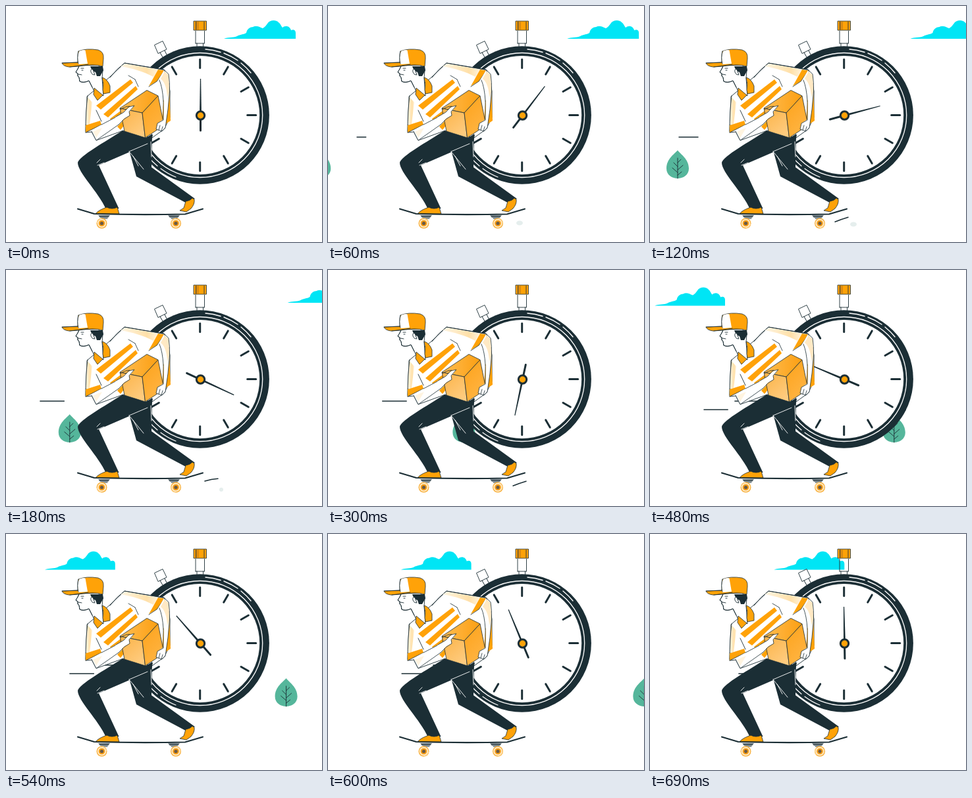
An HTML page that plays this animation: 480 by 360 pixels, repeating every 720 ms.

```html
<!DOCTYPE html>
<html lang="en">
<head>
<meta charset="utf-8">
<title>Fast delivery</title>
<style>
html, body { margin: 0; width: 100%; height: 100%; overflow: hidden; background: #fff; }
svg { display: block; width: 100vw; height: 100vh; }
.ink { fill: none; stroke: #1b2e35; stroke-linecap: round; stroke-linejoin: round; }
.skin { fill: #fff; stroke: #1b2e35; stroke-width: .9; stroke-linejoin: round; }
.dark { fill: #1b2e35; }
.orange { fill: #ffa208; }
.edge { stroke: #1b2e35; stroke-width: .8; stroke-linejoin: round; }
.light { fill: none; stroke: #fff; stroke-linecap: round; }
</style>
</head>
<body>
<svg viewBox="0 0 480 360" xmlns="http://www.w3.org/2000/svg">
<defs>
  <linearGradient id="side" x1="0" y1="0" x2=".7" y2="1">
    <stop offset="0" stop-color="#fbb245"/><stop offset="1" stop-color="#ffcc80"/>
  </linearGradient>
  <linearGradient id="face" x1="0" y1="0" x2=".5" y2="1">
    <stop offset="0" stop-color="#fda21a"/><stop offset="1" stop-color="#ffb442"/>
  </linearGradient>
  <linearGradient id="lid" x1="0" y1="0" x2="1" y2="0">
    <stop offset="0" stop-color="#ffbd52"/><stop offset="1" stop-color="#fc9f12"/>
  </linearGradient>
  <linearGradient id="cream" x1="0" y1="0" x2="1" y2="0">
    <stop offset="0" stop-color="#fff6e4"/><stop offset=".7" stop-color="#ffe0a8"/>
    <stop offset="1" stop-color="#fff3dc"/>
  </linearGradient>
  <path id="puffs" d="M0 28C8 25 13 27 20 24C25 21 29 22 34 19C35 13 40 10 44 10C49 7 54 10 59 12C62 10 64 8 66 5C69 0 78-2 83 3C86 5 87 9 89 11C93 7 100 8 102 15C106 13 109 15 109 19V28Z"/>
  <g id="wheel">
    <circle r="8" fill="#f7ad35"/>
    <circle r="5.800" fill="none" stroke="#ffe9c4" stroke-width="2"/>
    <circle r="4.300" fill="#f59a12"/>
    <circle r="2.600" fill="#6b5a45"/>
    <path d="M-7.400 0A7.400 7.400 0 0 1 0-7.400" fill="none" stroke="#ffd48b" stroke-width="1"/>
  </g>
  <g id="truck">
    <path d="M-9-12H9L6-8H-6Z" fill="#7d8990"/>
    <path class="ink" d="M-7-10H7M-4-7H5" stroke-width="1"/>
  </g>
</defs>

<use id="cloud" href="#puffs" fill="#00e5f5"/>

<g id="leaf">
  <path d="M0-23C4-17 17-10 17 5C17 15 8 20 0 20S-17 15-17 5C-17-10-5-17 0-23Z" fill="#55b69b"/>
  <path class="ink" d="M0-11V20M0-4L5-9M0 2L-6-4M0 7L8 0M0 11L-8 4M0 15L6 10" stroke-width=".9"/>
</g>

<g id="watch">
  <path class="ink" d="M288 38V57M301.500 38V57M288 57H301M290 57V62M299.500 57V62" stroke-width=".9"/>
  <path class="orange edge" d="M285 23H304.500V37H285Z"/>
  <path d="M289 24H293V36H289Z" fill="#d98a12"/>
  <path class="ink" d="M288.500 24V36M301 24V36" stroke-width=".9"/>
  <path class="skin" d="M225.500 59.500L238 53.500L244 66L231 72.500Z"/>
  <path class="ink" d="M234 71L238 78M241 68L244 74" stroke-width="1"/>
  <circle cx="294.700" cy="166.500" r="105.200" class="dark"/>
  <circle cx="294.700" cy="166.500" r="95" fill="none" stroke="#fff" stroke-width="1.300"/>
  <circle cx="294.700" cy="166.500" r="90.500" fill="#fff"/>
  <path class="light" d="M303 66A101 101 0 0 1 326 70.500M331 72A101 101 0 0 1 352 83M357 87A101 101 0 0 1 372 102" stroke-width="1.400"/>
  <path class="light" d="M216 230A101 101 0 0 0 230 244M235 248A101 101 0 0 0 258 261" stroke-width="1.200"/>
  <g id="ticks" class="ink" stroke-width="3"></g>
  <g id="hand">
    <path d="M-.6-56H.6L1.400-6H-1.400Z" class="dark"/>
    <path class="ink" d="M0 7V23" stroke-width="3"/>
  </g>
  <circle cx="295.500" cy="167" r="6.200" class="orange" stroke="#1b2e35" stroke-width="3"/>
</g>

<g class="ink" stroke-width="1.500" stroke-linecap="butt">
  <path id="wind1"/><path id="wind2"/>
  <path id="skid1"/><path id="skid2"/>
</g>
<ellipse id="dust" fill="#e5eeed"/>

<g id="rider">
  <path class="skin" d="M158 108L180 87L240 97L246 113L249 130V170L240 188L222 201L178 190L137 205L130 192L121 193L123 138L135 128Z" stroke="none"/>

  <!-- legs -->
  <path class="dark" d="M187 220L222 195L221 246L287 294L273 300L198 260Z"/>
  <path class="dark" d="M177 190L212 201L223 196Q222 206 217 210L141 243L171.500 309L152 310C140 283 109 254 109 239C111 229 151 207 177 190Z"/>
  <path class="light" d="M187 222L209 249M193 229L201 244M187 222L215 210M220 207L221 230M138 239L143 234M139 243L149 239" stroke-width=".9"/>
  <path class="orange edge" d="M136 317C141 311 148 309 153 307Q161 311 169 307L172 317Z"/>
  <path class="orange edge" d="M264 312L270 308L273 298Q280 297 283 293L286 295Q287 302 281 309L274 314Z"/>

  <!-- board -->
  <path class="ink" d="M109 309.500L134 317Q200 319 272 317.500L299 309.500" stroke-width="2.100"/>
  <use href="#truck" x="149" y="331"/><use href="#truck" x="255" y="331"/>
  <g id="wheel1"><use href="#wheel"/></g><g id="wheel2"><use href="#wheel"/></g>

  <!-- shirt -->
  <path d="M123 138L121 181L127 180L131 147Z" fill="url(#cream)"/>
  <path class="ink" d="M158 109Q168 96 180 87L240 97.500M124 137Q121 160 121 191M145 176L137 159" stroke-width=".9"/>
  <path d="M174 92L181 88L231 97L224 108C209 100 192 95 174 92Z" fill="url(#cream)"/>
  <g class="orange">
    <path d="M137 152L189 112L193 117L144 158Z"/>
    <path d="M148 165L197 122L200 127L155 170Z"/>
    <path d="M158 172L178 157L182 160L163 178Z"/>
    <path d="M169 184L181 172V180L174 189Z"/>
    <path d="M121 182L143 175L145 181L121 193Z"/>
    <path d="M231 97L241 98.500L229 115L217 122Z"/>
  </g>
  <path class="ink" d="M241 98L229 115L217 123M121 193L145 181M186 106Q191 109 196 112M196 112L201 123" stroke-width=".8"/>

  <!-- parcel -->
  <path class="orange" d="M241 128L248 130L250 175L236 184Z"/>
  <path class="edge" d="M173 156L214 128.500L231 137L207 163Z" fill="url(#lid)"/>
  <path class="edge" d="M173 156L207 163L211.500 201L180 191Z" fill="url(#side)"/>
  <path class="edge" d="M207 163L231 137L240 182L211.500 201Z" fill="url(#face)"/>

  <!-- far arm -->
  <path d="M240 98L246 113L248 134L246 158L242 185L236 191L228 188L230 179L239 173L240 144L231 113Z" fill="#fff"/>
  <path d="M235 111L241 100L247 105L248.500 130L245 140Q244 118 235 111Z" fill="#ffe9c4"/>
  <path class="ink" d="M241 98L247 104Q249 116 248.500 130L246 158L242 186L237 191L228 188L230 179L239 174V145M233 113Q238 125 239 145M236 191L238 184M232 189L234 182" stroke-width=".8"/>

  <!-- near arm -->
  <path d="M129 190L145 181L167 169L177 163L189 153L195 152L187 162L188 167L179 172L170 181L137 205Z" fill="#fff"/>
  <path d="M132 192L140 188L146 186L137 201Z" fill="#fff4e0"/>
  <path class="ink" d="M130 191L137 205L171 181M145 181L166 170M167 169L179 162L186 154L195 152L187 161L188 167L180 172L171 181M174 158Q180 153 188 153" stroke-width=".8"/>

  <!-- head -->
  <path class="skin" d="M111 91L109 96L106 101L109 103L109 107L111 109L112 115Q117 118 126 114L134 130L148 137L146 110L147 98L140 90Z" stroke="none"/>
  <path class="ink" d="M111 92L109 96L106 101L109 103L109 106L111 109L112 115Q118 118 126 114L131 124M110 104L115 105M114 95L118 95M115 98H117" stroke-width=".9"/>
  <path class="dark" d="M128 92H147L148 98L143 107H138L136 101Q130 99 128 92Z"/>
  <path class="skin" d="M132 97Q128 95 129 101Q131 106 135 105Z"/>
  <path class="orange edge" d="M146 109Q154 111 158 122V132L148 134L147 128Q149 118 146 109Z"/>
  <path class="orange edge" d="M134 125L147 136L139 144L133 135Z"/>

  <!-- cap -->
  <path class="orange edge" d="M110 69Q122 64 140 67Q149 70 148 80L147 92Q134 88 110 92L96 93Q87 92 85 87L109 86Z"/>
  <path d="M111 69Q118 66 120.500 67.500L124 88L110 89Q108 77 111 69Z" fill="#fff"/>
  <path class="ink" d="M110 69Q107 79 110 88M85 87L109 86M97 93L125 89" stroke-width=".8"/>
</g>
</svg>

<script>
const STEP = 30, COUNT = 24;
const $ = id => document.getElementById(id);
const put = (id, d) => $(id).setAttribute("d", d);
const move = (id, x, y, extra = "") =>
  $(id).setAttribute("transform", `translate(${x} ${y}) ${extra}`);

for (let a = 0; a < 360; a += 30) {
  const line = document.createElementNS("http://www.w3.org/2000/svg", "path");
  line.setAttribute("d", "M0-72V-85");
  line.setAttribute("transform", `translate(294.700 166.500) rotate(${a})`);
  $("ticks").append(line);
}

// Hand angle by step, joined smoothly
const keys = [[0, 0], [4, 75], [6, 115], [10, 192], [14, 262], [18, 319], [23, 359], [24, 360]];

function slope(i) {
  const a = keys[Math.max(0, i - 1)], b = keys[Math.min(keys.length - 1, i + 1)];
  return (b[1] - a[1]) / (b[0] - a[0]);
}

function handAngle(n) {
  let i = 0;
  while (n > keys[i + 1][0]) i++;
  const [x0, y0] = keys[i], [x1, y1] = keys[i + 1];
  const w = x1 - x0, u = (n - x0) / w, v = 1 - u;
  return y0 * (1 + 2 * u) * v * v + y1 * (3 - 2 * u) * u * u
    + w * u * v * (slope(i) * v - slope(i + 1) * u);
}

function wind(id, right, y, start) {
  const left = Math.max(start, right - 36.5);
  put(id, right > left ? `M${left} ${y}H${right}` : "");
}

// Ground streak: a short piece sliding along a shallow arc
const arcY = x => 318.2 + (x < 322 ? .042 * (322 - x) ** 1.5 : .0095 * (x - 322) ** 2);

function skid(id, x) {
  const a = Math.max(281, x), b = Math.min(342, x + 20);
  if (b <= a) return put(id, "");
  const m = (a + b) / 2;
  const bend = 2 * arcY(m) - (arcY(a) + arcY(b)) / 2;
  put(id, `M${a} ${arcY(a)}Q${m} ${bend} ${b} ${arcY(b)}`);
}

function draw(n) {
  move("hand", 295.5, 167, `rotate(${handAngle(n)})`);
  if (n < 11) move("cloud", 331 + 16.1 * n, 22);
  else move("cloud", 59 + 25.9 * (n - 18), 26.5, "scale(.98 1)");
  move("leaf", 42 + 27.4 * (n - 4), 243);
  wind("wind1", 73 + 7.7 * (n - 4), 200, 44);
  wind("wind2", 103 + 7.6 * (n - 14), 213, 82);
  skid("skid1", 281 + 10.5 * (n - 4));
  skid("skid2", 281 + 10.5 * (n - 10));

  const dust = $("dust"), size = n > 1 && n < 9 ? Math.max(0, 5 - (n - 4)) : 0;
  dust.setAttribute("cx", 309 + 9 * (n - 4));
  dust.setAttribute("cy", 333 + (n - 4));
  dust.setAttribute("rx", Math.min(5, size));
  dust.setAttribute("ry", Math.min(3.5, size));

  move("wheel1", 145.5, 331.5, `rotate(${n * 45})`);
  move("wheel2", 258, 331.5, `rotate(${n * 45})`);
}

const begin = performance.now();
function tick() {
  draw(Math.floor((performance.now() - begin) / STEP) % COUNT);
  requestAnimationFrame(tick);
}
tick();
</script>
</body>
</html>
```
